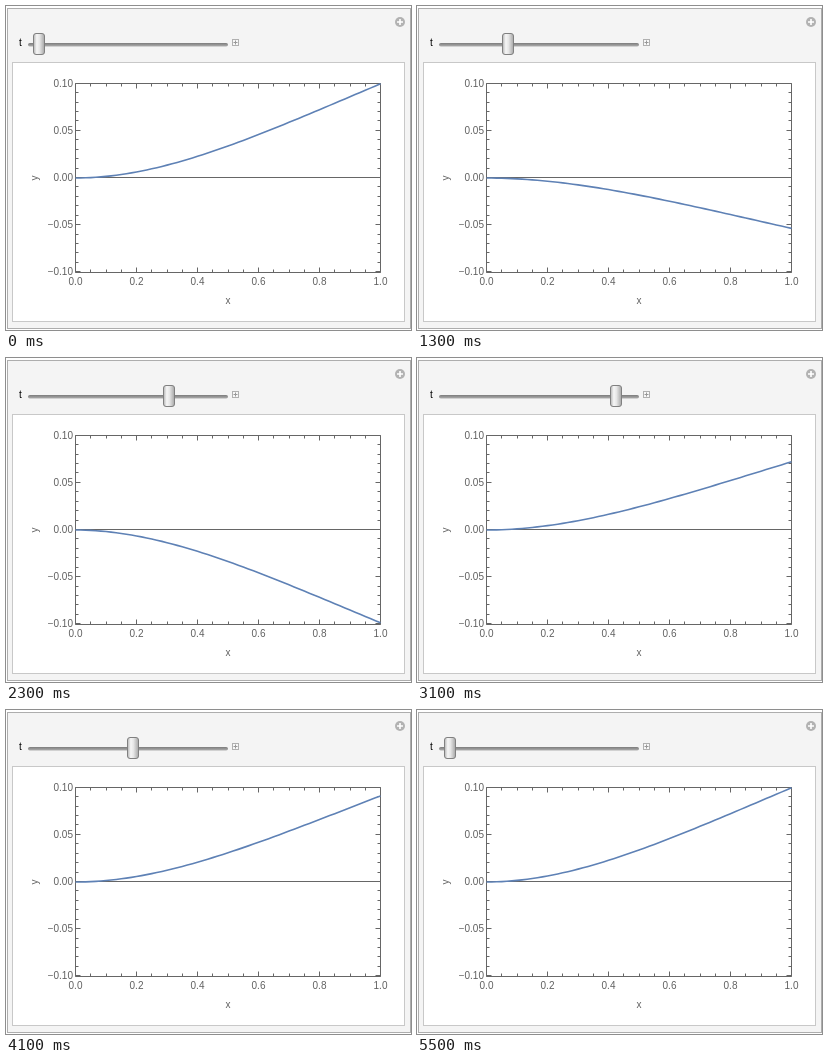
An HTML page that plays this animation: 405 px wide and 324 px high, repeating every 6000 ms.

```html
<!DOCTYPE html>
<html>
<head>
<meta charset="utf-8">
<style>
html, body { margin: 0; width: 100%; height: 100%; overflow: hidden; background: #fff; }
svg { display: block; width: 405px; height: 324px; }
text { font: 10px "Liberation Sans", Arial, sans-serif; fill: #606060; }
</style>
</head>
<body>
<svg viewBox="0 0 405 324">
  <defs>
    <linearGradient id="metal">
      <stop offset="0" stop-color="#b4b4b4"/>
      <stop offset=".3" stop-color="#f6f6f6"/>
      <stop offset=".55" stop-color="#e6e6e6"/>
      <stop offset="1" stop-color="#a6a6a6"/>
    </linearGradient>
    <linearGradient id="groove" x2="0" y2="1">
      <stop offset="0" stop-color="#7c7c7c"/>
      <stop offset="1" stop-color="#b0b0b0"/>
    </linearGradient>
  </defs>
  <rect x="1.5" y="2.5" width="403" height="320" fill="#f4f4f4" stroke="#adadad"/>
  <rect x="6.5" y="56.5" width="392" height="259" fill="#fff" stroke="#c8c8c8"/>
  <circle cx="394" cy="16" r="5" fill="#b2b2b2"/>
  <path d="M391 16h6M394 13v6" stroke="#fff" stroke-width="1.6"/>
  <text x="13" y="40" style="fill:#000">t</text>
  <rect x="22" y="37" width="200" height="3.6" rx="1.8" fill="url(#groove)"/>
  <rect x="226.5" y="33.5" width="6" height="6" fill="#f8f8f8" stroke="#b0b0b0"/>
  <path d="M227.5 36.5h4M229.5 34.5v4" stroke="#999"/>
  <g id="knob">
    <rect x="-5.5" y="27.5" width="11" height="21" rx="2.5" fill="url(#metal)" stroke="#808080"/>
  </g>
  <path id="axes" fill="none" stroke="#666"/>
  <g id="labels"></g>
  <text x="222" y="298" text-anchor="middle">x</text>
  <text transform="translate(32 172) rotate(-90)" text-anchor="middle">y</text>
  <path id="curve" fill="none" stroke="#5e81b5" stroke-width="1.6"/>
</svg>
<script>
const LEFT = 69.5, RIGHT = 374.5, TOP = 77.5, BOTTOM = 266.5;
const WIDTH = RIGHT - LEFT, MID = 172, AMP = 94.2;
const LOOP = 6000, STEP = 100, LAST = 25;
const $ = id => document.getElementById(id);
const snap = v => Math.floor(v) + 0.5;

function drawAxes() {
  let d = `M${LEFT} ${TOP}H${RIGHT}V${BOTTOM}H${LEFT}ZM${LEFT} 171.5H${RIGHT}`;
  let labels = '';
  for (let i = 0; i <= 20; i++) {
    const x = snap(LEFT + WIDTH * i / 20), len = i % 4 ? 3 : 5;
    d += `M${x} ${TOP}v${len}M${x} ${BOTTOM}v${-len}`;
    if (i % 4 === 0)
      labels += `<text x="${x}" y="279" text-anchor="middle">${(i / 20).toFixed(1)}</text>`;
  }
  for (let i = -10; i <= 10; i++) {
    const y = snap(MID - 0.5 - (i * 9.43)), len = i % 5 ? 3 : 5;
    d += `M${LEFT} ${y}h${len}M${RIGHT} ${y}h${-len}`;
    if (i % 5 === 0) {
      const value = (i < 0 ? '\u2212' : '') + Math.abs(i / 100).toFixed(2);
      labels += `<text x="67" y="${y + 3.5}" text-anchor="end">${value}</text>`;
    }
  }
  $('axes').setAttribute('d', d);
  $('labels').innerHTML = labels;
}

// First bending mode of a cantilever beam
function mode(x) {
  const b = 1.8751 * x;
  return Math.cosh(b) - Math.cos(b) - 0.7341 * (Math.sinh(b) - Math.sin(b));
}

// Forward and back, resting at both ends
function stepAt(ms) {
  const n = Math.floor(ms / STEP);
  const k = n < 30 ? n - 4 : 55 - n;
  return Math.max(0, Math.min(LAST, k));
}

function render(ms) {
  const k = stepAt(ms);
  const travel = k ? 0.9 + 7.18 * (k - 1) : 0;
  const swing = AMP * Math.cos(0.0711 * travel) / mode(1);
  let d = '';
  for (let i = 0; i <= 60; i++) {
    const x = i / 60;
    d += `${i ? 'L' : 'M'}${(LEFT + WIDTH * x).toFixed(2)} ${(MID - swing * mode(x)).toFixed(2)}`;
  }
  $('curve').setAttribute('d', d);
  $('knob').setAttribute('transform', `translate(${Math.round(33 + travel)} 0)`);
}

drawAxes();
render(0);
const start = performance.now();
function tick() {
  render((performance.now() - start) % LOOP);
  requestAnimationFrame(tick);
}
requestAnimationFrame(tick);
</script>
</body>
</html>
```
